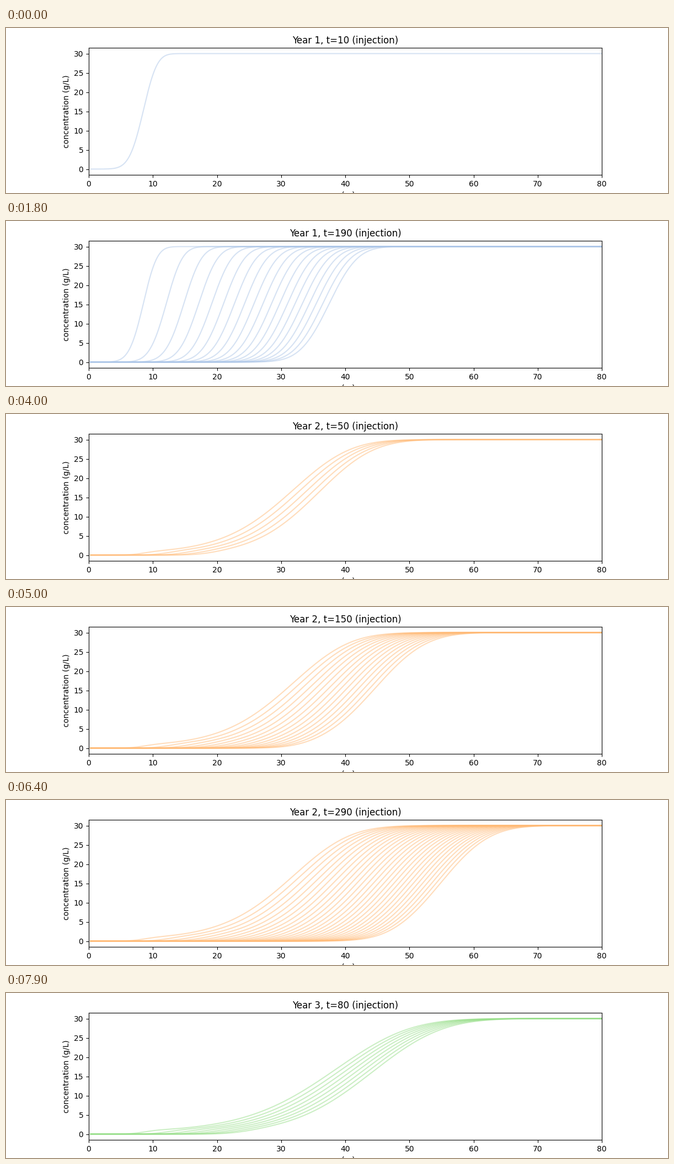
A matplotlib script for the animation above (8 s loop, 1200 by 300 pixels).

```python
import numpy as np
import matplotlib.pyplot as plt
from matplotlib.animation import FuncAnimation

# Radial flow around a well: fresh water is injected into salt water, then pumped back
C_SALT = 30.0
ALPHA = 0.5                 # dispersivity (m)
RATE = 3.715                # r * v during injection (m2/d)
DAYS_IN, DAYS_OUT = 300, 65
RECOVERY = (0.604, 0.8)     # share of a year's injection that is pumped back
STEP, DT = 10, 0.02         # days per frame, days per time step
FRAMES, PER_YEAR = 80, 36

faces = np.linspace(0.2, 100.2, 501)
r = (faces[:-1] + faces[1:]) / 2
dr = faces[1] - faces[0]
area = (faces[1:] ** 2 - faces[:-1] ** 2) / 2


def propagator(rate, days):
    """Matrix that carries the concentrations on by some days."""
    n = len(r)
    flux = np.zeros((n + 1, n))
    inner = np.arange(1, n)
    spread = ALPHA * abs(rate) / dr
    flux[inner, inner - 1] = rate / 2 + spread
    flux[inner, inner] = rate / 2 - spread
    flux[0, 0] = min(rate, 0)       # injected water is fresh
    flux[n, n - 1] = rate
    change = (flux[:-1] - flux[1:]) / area[:, None]
    step = np.linalg.inv(np.eye(n) - DT * change)
    return np.linalg.matrix_power(step, round(days / DT))


def simulate():
    """Return (year, day, injecting, concentration) for every frame."""
    inject = propagator(RATE, STEP)
    c = np.full(len(r), C_SALT)
    states = []
    for i in range(FRAMES):
        year, k = divmod(i, PER_YEAR)
        day = (k + 1) * STEP
        injecting = day <= DAYS_IN
        if day == DAYS_IN + STEP:
            rate = -RATE * RECOVERY[year] * DAYS_IN / DAYS_OUT
            half = propagator(rate, STEP / 2)
            extract = half @ half
        c = (inject if injecting else extract) @ c
        states.append((year, day, injecting, c))
        if k == PER_YEAR - 1:
            c = half @ c            # last five days of the year
    return states


states = simulate()
colors = plt.get_cmap("tab20").colors

fig, ax = plt.subplots(figsize=(12, 3), dpi=100)
ax.set_xlim(0, 80)
ax.set_ylim(-1.5, 31.5)
ax.set_yticks(range(0, 31, 5))
ax.set_xlabel("r (m)")
ax.set_ylabel("concentration (g/L)")
title = ax.set_title("")

lines = []
for year, day, injecting, c in states:
    line, = ax.plot(r, c, color=colors[2 * year + injecting],
                    alpha=0.5 if injecting else 1)
    lines.append(line)


def draw(i):
    year, day, injecting, _ = states[i]
    for j, line in enumerate(lines):
        line.set_visible(j <= i and states[j][0] == year)
    phase = "injection" if injecting else "extraction"
    title.set_text(f"Year {year + 1}, t={day} ({phase})")
    return lines + [title]


anim = FuncAnimation(fig, draw, frames=FRAMES, interval=100,
                     init_func=lambda: draw(0), repeat=True, repeat_delay=0)
plt.show()
```
